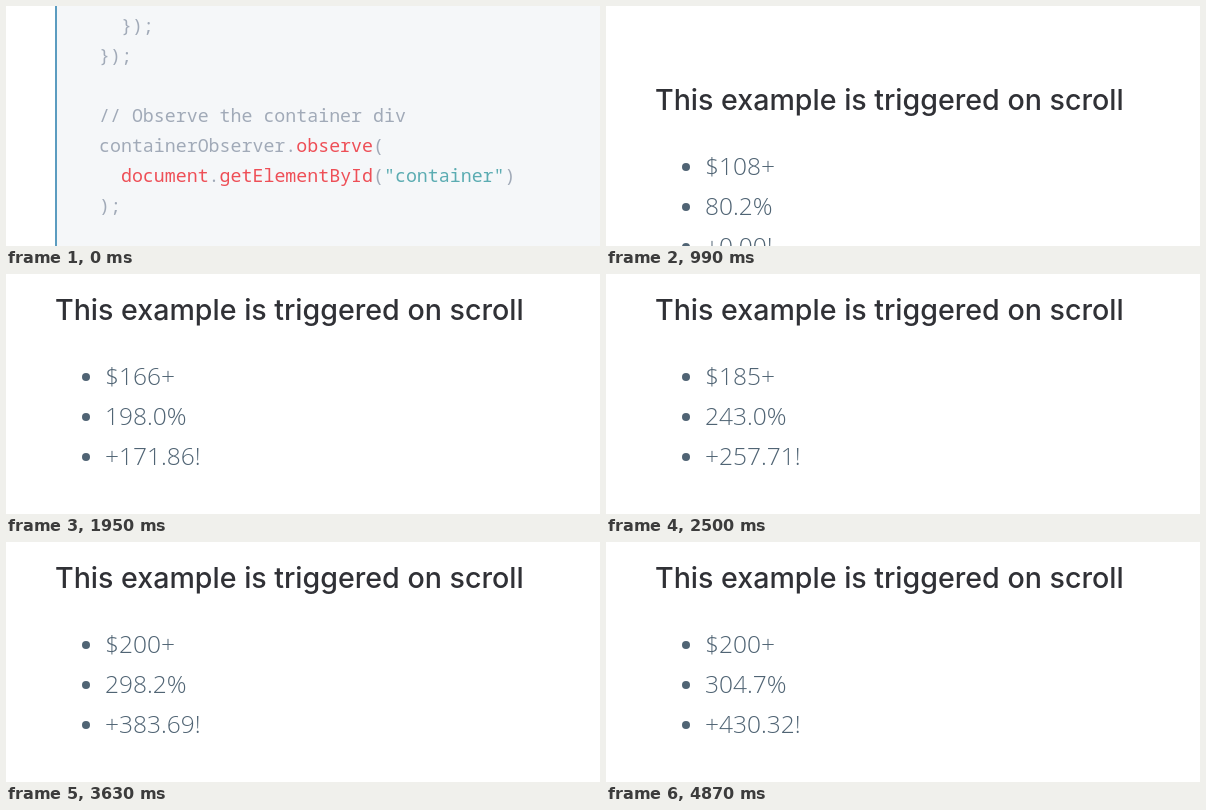
Write an HTML page that moves like this. It is 594x240 px and loops after 5.41 s.

```html
<!DOCTYPE html>
<html lang="en">
<head>
<meta charset="utf-8">
<title>Counters on scroll</title>
<style>
  html, body { margin: 0; width: 100%; height: 100%; overflow: hidden; background: #fff; }
  svg { display: block; width: 594px; height: 240px; }
  text { white-space: pre; font-optical-sizing: none; }
  .code { font: 18.28px "Noto Sans Mono", monospace; fill: #a1aab8; }
  .red { fill: #ee4f57; }
  .teal { fill: #5bacb2; }
  h2, .title { font: 500 28.6px Inter, sans-serif; fill: #303136; }
  .list { font: 300 24.5px "Open Sans", "Noto Sans", sans-serif; fill: #506474; }
</style>
</head>
<body>
<svg viewBox="0 0 594 240">
  <g id="page">
    <g class="code" transform="translate(0 -396)">
      <rect x="49" width="545" height="249" fill="#f5f7f9"/>
      <rect x="49" width="2" height="249" fill="#5b9cc0"/>
      <text x="93" y="26">  });</text>
      <text x="93" y="56">});</text>
      <text x="93" y="116">// Observe the container div</text>
      <text x="93" y="146">containerObserver.<tspan class="red">observe</tspan>(</text>
      <text x="93" y="176">  <tspan class="red">document</tspan>.<tspan class="red">getElementById</tspan>(<tspan class="teal">"container"</tspan>)</text>
      <text x="93" y="206">);</text>
    </g>
    <text class="title" x="49" y="46">This example is triggered on scroll</text>
    <g class="list">
      <circle cx="80" cy="103" r="4"/>
      <circle cx="80" cy="143" r="4"/>
      <circle cx="80" cy="183" r="4"/>
      <text class="count" x="99" y="111"></text>
      <text class="count" x="99" y="151"></text>
      <text class="count" x="99" y="191"></text>
    </g>
  </g>
</svg>
<script>
const LOOP = 5410;
// [time in ms, step number]; steps are evenly spread between entries
const BEATS = [
  [0, 0], [160, 1], [600, 7], [690, 8], [750, 9], [1290, 16], [1350, 17], [1430, 18],
  [1890, 24], [1950, 25], [2030, 26], [2410, 31], [2500, 32], [3030, 39], [3090, 40],
  [3170, 41], [3630, 47], [3690, 48], [4160, 54], [4250, 55], [4790, 62], [4870, 63]
];
const SCROLL = 396, SCROLL_STEPS = 19.4;
const TICKS = 240, STAGGER = 44;

const page = document.getElementById("page");
const counts = document.querySelectorAll(".count");
const clamp = x => Math.min(1, Math.max(0, x));

function stepAt(t) {
  const i = BEATS.findLastIndex(b => b[0] <= t);
  const [t0, k0] = BEATS[i];
  if (i === BEATS.length - 1) return k0;
  const [t1, k1] = BEATS[i + 1];
  return k0 + Math.floor((t - t0) / (t1 - t0) * (k1 - k0));
}

function count(end, tick) {
  return end * (1 - (1 - clamp(tick / TICKS)) ** 2);
}

function draw(t) {
  const step = stepAt(t);
  const scroll = Math.round(SCROLL * (1 - clamp(step / SCROLL_STEPS)) ** 2);
  const tick = Math.floor(15 + (step - 17) * 4.892);
  page.setAttribute("transform", `translate(0 ${scroll})`);
  counts[0].textContent = `$${Math.floor(count(200, tick + 2 * STAGGER))}+`;
  counts[1].textContent = `${count(304.7, tick + STAGGER).toFixed(1)}%`;
  counts[2].textContent = `+${count(430.32, tick).toFixed(2)}!`;
}

const start = performance.now();
function frame() {
  draw((performance.now() - start) % LOOP);
  requestAnimationFrame(frame);
}
frame();
</script>
</body>
</html>
```
